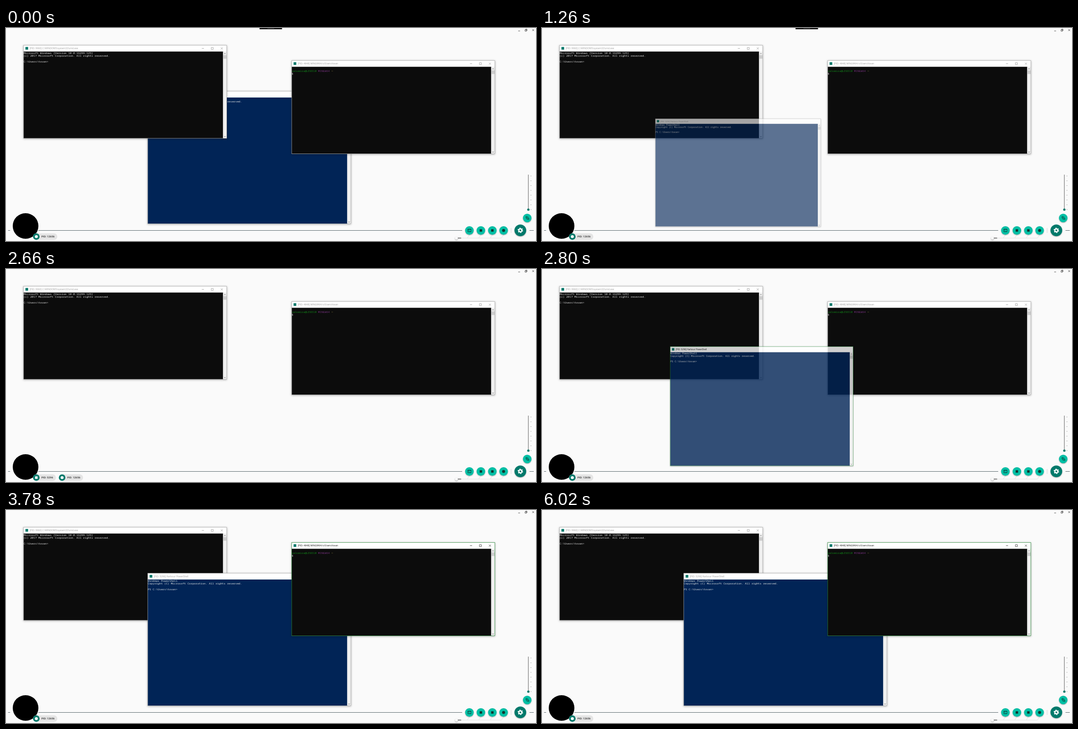
Animation, 1178 px wide and 475 px high, one loop 6.39 s. Source, as an HTML page:

```html
<!DOCTYPE html>
<html lang="en">
<head>
<meta charset="utf-8">
<title>Terminal windows</title>
<style>
  html, body { margin: 0; width: 100%; height: 100%; overflow: hidden; background: #fafafa; }
  svg { display: block; width: 100vw; height: 100vh; }
  .console { font: 6.14px "Noto Sans Mono", "DejaVu Sans Mono", monospace; }
  .title { font: 5.22px "Open Sans", "Noto Sans", sans-serif; }
  .chip { font: 500 5.9px Roboto, sans-serif; fill: #333; }
  .frame { filter: drop-shadow(0 1px 2px rgba(0, 0, 0, .32)); }
  .button { filter: drop-shadow(0 1px 1px rgba(0, 0, 0, .35)); }
</style>
</head>
<body>
<svg viewBox="0 0 1178 475"><g id="back"></g><g id="scene"></g></svg>
<script>
const LOOP = 6390;
const TEAL = '#00796b', MINT = '#00bfa5', INK = '#12332e';

const rect = (x, y, w, h, fill, extra = '') =>
  `<rect x="${x}" y="${y}" width="${w}" height="${h}" fill="${fill}" ${extra}/>`;
const disc = (x, y, r, fill, extra = '') =>
  `<circle cx="${x}" cy="${y}" r="${r}" fill="${fill}" ${extra}/>`;
const line = (d, color, width = 0.8) =>
  `<path d="${d}" fill="none" stroke="${color}" stroke-width="${width}"/>`;
const text = (x, y, cls, fill, content) =>
  `<text x="${x}" y="${y}" class="${cls}" fill="${fill}">${content}</text>`;
const tint = (color, content) => `<tspan fill="${color}">${content}</tspan>`;

const WIDTH = 451.5, BAR = 14, PANE = 443.5;

const shells = {
  cmd: {
    x: 39, y: 38.5, h: 207.5, fill: '#0c0c0c',
    title: '[PID: 9960] C:\\WINDOWS\\system32\\cmd.exe',
    rows: [[19, 'Microsoft Windows [Version 10.0.16299.125]'],
           [25.4, '(c) 2017 Microsoft Corporation. All rights reserved.'],
           [38.4, 'C:\\Users\\tovan&gt;']]
  },
  power: {
    x: 315, y: 141, h: 295.5, fill: '#012456', caret: [70.3, 38.5],
    title: '[PID: 5296] Harbour PowerShell',
    rows: [[19, 'Windows PowerShell'],
           [25.4, 'Copyright (C) Microsoft Corporation. All rights reserved.'],
           [38.4, 'PS C:\\Users\\tovan&gt;']]
  },
  bash: {
    x: 635, y: 72.5, h: 208, fill: '#0c0c0c', caret: [7.4, 31.5],
    title: '[PID: 4848] MINGW64:/c/Users/tovan',
    rows: [[25.4, tint('#13891a', 'velomira@LE6510') + tint('#76327f', ' MINGW64') + tint('#a49c4a', ' ~')],
           [31.9, '$']]
  }
};

function controls(color, minimizeFill) {
  return (minimizeFill ? rect(387.5, 0.5, 20.7, 13.3, minimizeFill) : '') +
    line('M396.2 7h4.8M417.2 4.8h4.4v4.4h-4.4zM438.4 4.8l4.4 4.4m0-4.4l-4.4 4.4', color, 0.7);
}

function scrollbar(h) {
  return rect(PANE, BAR, WIDTH - PANE, h - BAR, '#f0f0f0') +
    rect(PANE + 0.3, 22, 7.2, 8, '#cdcdcd') +
    line(`M445.9 19.4l1.6-1.6 1.6 1.6M445.9 ${h - 4.7}l1.6 1.6 1.6-1.6`, '#505050', 0.9);
}

// view: active, caret, minimizeFill, and x / y / scale / opacity while moving
function shellWindow(name, view = {}) {
  const shell = shells[name];
  const { active, caret, minimizeFill, x = shell.x, y = shell.y, scale, opacity = 1 } = view;
  const rows = shell.rows.map(([top, row]) => text(0, top, 'console', '#e4e4e4', row)).join('');
  return `<g class="frame" opacity="${opacity}" transform="translate(${x} ${y}) scale(${scale || 1})">` +
    rect(0, 0, WIDTH, shell.h, '#fff') +
    rect(4.2, 3.8, 6, 6, TEAL) +
    text(13.6, 8.9, 'title', active ? '#111' : '#999', shell.title) +
    (scale ? '' : controls(active ? '#111' : '#888', minimizeFill)) +
    rect(0, BAR, PANE, shell.h - BAR, shell.fill) +
    rows +
    (caret ? rect(...shell.caret, 4, 1.5, '#f2f2f2') : '') +
    scrollbar(shell.h) +
    rect(0, 0, WIDTH, shell.h, 'none', `stroke="${active ? '#2a8a3a' : '#aaa'}" stroke-width=".8"`) +
    '</g>';
}

function chip(x, pid, width, icon) {
  return rect(x, 458, width, 14.5, '#e4e4e4', 'rx="7.25"') +
    disc(x + 7.4, 465.2, 7.3, TEAL) + icon(x + 7.4) +
    text(x + 18.8, 467.3, 'chip', '#333', 'PID: ' + pid);
}
const roundIcon = x => disc(x, 465.2, 3.3, '#fff');
const squareIcon = x => rect(x - 2.8, 462.4, 5.6, 5.6, '#fff');

function button(x, y, icon, r = 9.5, fill = MINT) {
  return `<g transform="translate(${x} ${y})">${disc(0, 0, r, fill, 'class="button"')}${icon}</g>`;
}

function backdrop() {
  const ticks = Array.from({ length: 8 }, (_, i) => `M1165.8 ${330 + i * 10.7}h2`).join('');
  const links = [1030, 1055.5, 1081, 1106].map(x => `M${x - 5} 468.5l5-7`).join('');
  const gear = disc(0, 0, 3.3, 'none', 'stroke="#fff" stroke-width="2.5"') +
    disc(0, 0, 5.1, 'none', 'stroke="#fff" stroke-width="1.9" stroke-dasharray="2.67"');
  const terminal = line('M-3.6-3h7.2v6h-7.2zM-3.6-2.3h7.2M-2.2-.7l1.3 1.2-1.3 1.2M.2 1.8h2', INK);
  const tree = line('M-3-3.4h2.6v2.6H-3zM-1.7-.8v3h3M1.2.8h2.6v2.6H1.2zM-.4-2h2.4v2.4', INK);

  return line('M1138.5 6.6h4M1153.7 3.9h3.2v3.2h-3.2zM1154.8 3.8v-1.1h3.2v3.2h-1M1169.7 2.7l4 4m0-4l-4 4', '#222') +
    line('M4.5 451.5h4.7M72 451.5h942M1163.5 451.5h9.5', '#56646a', 1) +
    line('M1122.7 446v11', '#ccc') +
    line('M1161 327v78', '#555', 1) + line(ticks, '#888') +
    disc(1161, 405, 2.6, TEAL) +
    line('M1012 468.5h89' + links, '#dcdcdc') +
    rect(1002, 466.9, 10, 3.2, '#9e9e9e', 'rx="1.6"') +
    disc(1001.2, 468.6, 3.2, '#fafafa', 'class="button"') +
    button(1030, 451.5, terminal) +
    button(1055.5, 451.5, rect(-2.7, -2.7, 5.4, 5.4, INK)) +
    button(1081, 451.5, rect(-2.7, -2.7, 5.4, 5.4, INK)) +
    button(1106, 451.5, disc(0, 0, 3.3, INK)) +
    button(1158.5, 423.7, tree) +
    button(1143.2, 451.2, gear, 13, TEAL) +
    disc(43.5, 441.5, 28.5, '#000');
}

const topTab = () => rect(563.5, 0, 50, 2.8, '#111') + rect(581, 0, 15, 1.2, '#444');
const inFront = view => shellWindow('cmd') + shellWindow('bash') + shellWindow('power', view);
const bashActive = caret => shellWindow('cmd') + shellWindow('power') +
  shellWindow('bash', { active: true, caret });
const minimized = () => shellWindow('cmd') + shellWindow('bash');
const oneChip = () => chip(60, '12656', 54, roundIcon);
const twoChips = () => chip(60, '5296', 51, squareIcon) + chip(117.3, '12656', 54, roundIcon);

const steps = [
  [0, () => shellWindow('power') + minimized() + oneChip() + topTab()],
  [280, () => inFront({ active: true }) + oneChip()],
  [840, () => inFront({ active: true, caret: true }) + oneChip()],
  [980, () => inFront({ active: true, caret: true, minimizeFill: '#e5e5e5' }) + oneChip()],
  [1120, () => inFront({ active: true, caret: true, minimizeFill: '#c8c8c8' }) + oneChip()],
  [1260, () => inFront({ x: 252, y: 202.3, scale: 0.814, opacity: 0.63 }) + oneChip() + topTab()],
  [1400, () => minimized() + twoChips() + topTab()],
  [2660, () => minimized() + twoChips()],
  [2800, () => inFront({ active: true, x: 285, y: 173, scale: 0.9, opacity: 0.8 }) + oneChip()],
  [2940, () => inFront({ active: true }) + oneChip()],
  [3220, () => inFront({ active: true, caret: true }) + oneChip()],
  [3780, () => bashActive(false) + oneChip()],
  [4480, () => bashActive(true) + oneChip()],
  [5040, () => bashActive(false) + oneChip()],
  [5460, () => bashActive(true) + oneChip()],
  [6020, () => bashActive(false) + oneChip()]
];

const scene = document.getElementById('scene');
document.getElementById('back').innerHTML = backdrop();
let shown = null;

function tick() {
  const time = performance.now() % LOOP;
  const step = steps.findLast(([start]) => start <= time);
  if (step !== shown) {
    scene.innerHTML = step[1]();
    shown = step;
  }
  requestAnimationFrame(tick);
}
tick();
</script>
</body>
</html>
```
